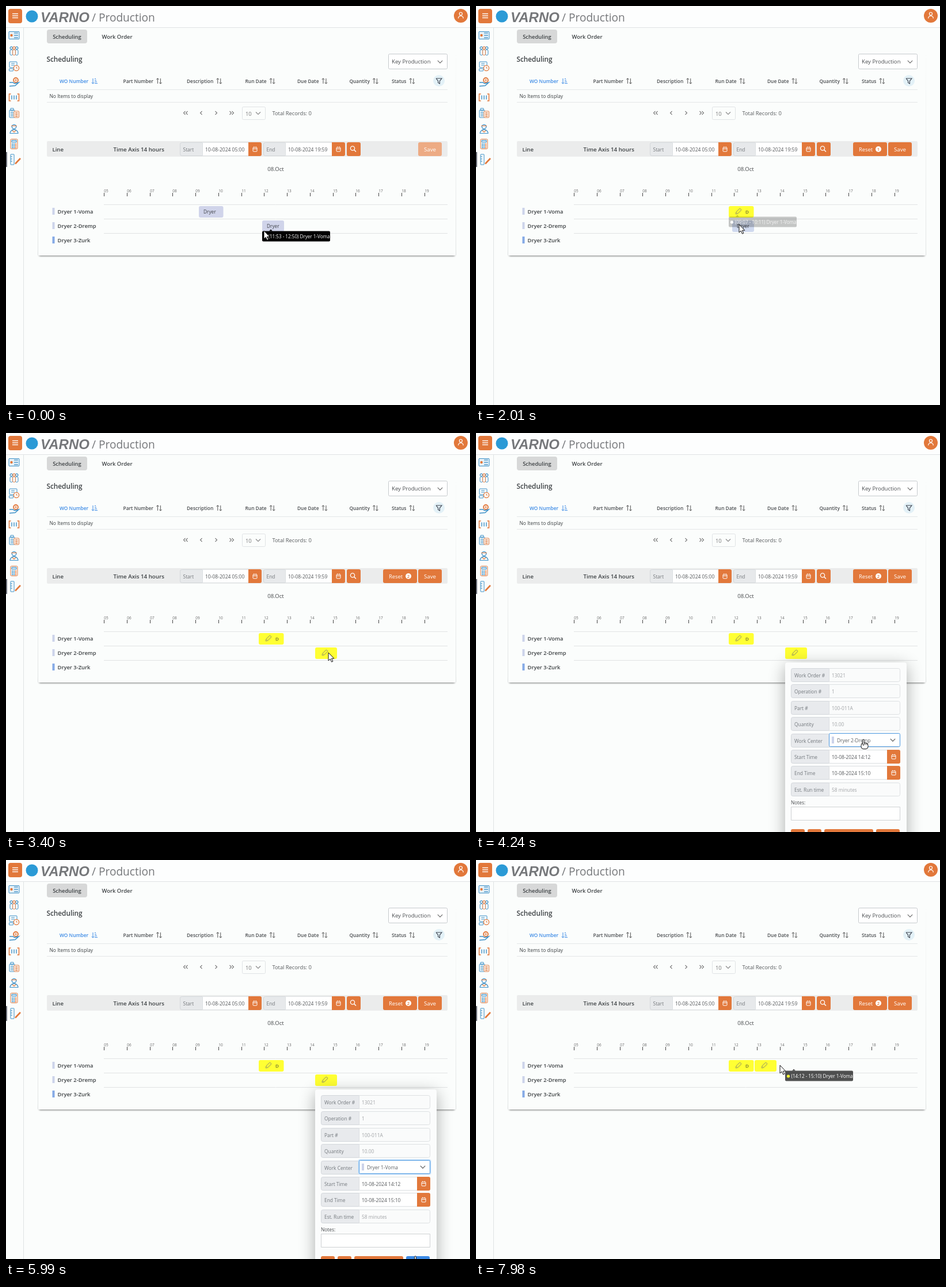
An HTML page with a canvas that plays this animation: 806x694 px, repeating every 8000 ms.

```html
<!DOCTYPE html>
<html lang="en">
<head>
<meta charset="utf-8">
<title>Production scheduling</title>
<style>
html, body { margin: 0; width: 100%; height: 100%; overflow: hidden; background: #fbfdfc; }
canvas { display: block; }
</style>
</head>
<body>
<canvas id="stage" width="806" height="694"></canvas>
<script>
const ctx = document.getElementById('stage').getContext('2d');
const LOOP = 8000, STEP = 134;
const ORANGE = '#e2783b', BLUE = '#3b8fc6', LINK = '#3b8ae6', INK = '#3c4043', PAGE = '#fbfdfc';
const LILAC = '#d0d4ea', YELLOW = '#ffff33', RULE = '#dde0e2';
const LINES = ['Dryer 1-Voma', 'Dryer 2-Dremp', 'Dryer 3-Zurk'];
const BARS = ['#ccd3ea', '#ccd3ea', '#85aae6'];
const SANS = '"Open Sans", "Noto Sans", sans-serif';
const HOUR = 39.77, AXIS = 170.5;

// Moments of the story, in ms
const AT = {
  grabA: 1210, dropA: 1880, grabB: 2430, dropB: 3000, form: 3550, focus: 3980, list: 4520,
  pick: 5050, ok: 5730, close: 6250, moved: 6390, grabC: 7330, dropC: 7850
};

// Pointer stops: time, x, y
const STOPS = [
  [0, 448, 391], [800, 351, 366], [1060, 350, 363], [1200, 383, 361], [AT.dropA, 471, 361], [2010, 457, 380],
  [AT.grabB, 468, 380], [2850, 560, 382], [AT.form, 560, 382], [AT.focus, 673, 533], [4640, 673, 533],
  [4910, 662, 556], [AT.ok, 711, 689], [6600, 711, 689], [7180, 559, 374], [AT.grabC, 557, 361],
  [AT.dropC, 504, 358], [7900, 528, 357]
];

function pointerAt(time) {
  const t = Math.floor(time / STEP) * STEP;
  const i = STOPS.findIndex(s => s[0] > t);
  if (i < 0) return STOPS.at(-1).slice(1);
  const [t0, x0, y0] = STOPS[i - 1], [t1, x1, y1] = STOPS[i];
  const u = (t - t0) / (t1 - t0), k = u * u * (3 - 2 * u);
  return [x0 + (x1 - x0) * k, y0 + (y1 - y0) * k];
}

const within = (t, a, b) => t >= a && t < b;

function text(s, x, y, size, color = INK, weight = 400, align = 'left') {
  ctx.font = `${weight} ${size}px ${SANS}`;
  ctx.fillStyle = color;
  ctx.textAlign = align;
  ctx.fillText(s, x, y + size * 0.36);
  return ctx.measureText(s).width;
}

function paint(fill, stroke, width = 1) {
  if (fill) { ctx.fillStyle = fill; ctx.fill(); }
  if (stroke) { ctx.strokeStyle = stroke; ctx.lineWidth = width; ctx.stroke(); }
}

function box(x, y, w, h, fill, r = 0, stroke) {
  ctx.beginPath();
  ctx.roundRect(x, y, w, h, r);
  paint(fill, stroke);
}

function disc(x, y, r, fill, stroke, width) {
  ctx.beginPath();
  ctx.arc(x, y, r, 0, Math.PI * 2);
  paint(fill, stroke, width);
}

// Upper half circle
function dome(x, y, r, color) {
  ctx.beginPath();
  ctx.arc(x, y, r, Math.PI, 0);
  paint(null, color, 1.3);
}

function line(color, width, ...p) {
  ctx.beginPath();
  for (let i = 0; i < p.length; i += 2) ctx.lineTo(p[i], p[i + 1]);
  paint(null, color, width);
}

const hline = (color, y, x0, x1) => line(color, 1, x0, y, x1, y);

// n parallel strokes, each (w, h) long, spaced by (dx, dy)
function strokes(color, width, n, x, y, w, h, dx, dy) {
  for (let i = 0; i < n; i++) line(color, width, x + i * dx, y + i * dy, x + i * dx + w, y + i * dy + h);
}

function at(x, y, draw, alpha = 1, angle = 0) {
  ctx.save();
  ctx.translate(x, y);
  ctx.rotate(angle);
  ctx.globalAlpha *= alpha;
  draw();
  ctx.restore();
}

// Points down at angle 0
const chevron = (x, y, s = 4, color = '#666', angle = 0) =>
  at(x, y, () => line(color, 1.1, -s, -s / 2, 0, s / 2, s, -s / 2), 1, angle);

function arrow(x, y, color, angle = 0) {
  at(x, y, () => {
    line(color, 1, 0, -4.5, 0, 4.5);
    line(color, 1, -2.2, 2.5, 0, 4.8, 2.2, 2.5);
  }, 1, angle);
}

function calendar(x, y, h = 24) {
  box(x, y, 23, h, ORANGE, [0, 3, 3, 0]);
  at(x + 11.5, y + h / 2, () => {
    box(-3.5, -3, 7, 7, null, 1, '#fff');
    hline('#fff', -0.5, -3.5, 3.5);
    strokes('#fff', 1, 2, -1.8, -4.5, 0, 1.5, 3.6, 0);
  });
}

const icons = [
  () => {
    box(-9, -6.5, 18, 13, '#e6f1f8', 1, BLUE);
    disc(-4.5, 0, 2.2, ORANGE);
    strokes(BLUE, 1.3, 3, 0, -4, 7, 0, 0, 4);
  },
  () => {
    for (const [x, color] of [[-4.7, BLUE], [4.7, BLUE], [0, ORANGE]]) {
      disc(x, -5, 2.2, PAGE, color, 1.2);
      box(x - 2.3, -2, 4.6, 9.5, PAGE, 2, color);
    }
  },
  () => {
    box(-8, -8, 13, 10, null, 1, BLUE);
    strokes(BLUE, 1, 2, -5, -5, 6, 0, 0, 3);
    box(-8.5, 4, 7, 4, null, 0.5, BLUE);
    disc(4, 3, 4.6, PAGE, ORANGE, 1.3);
    line(ORANGE, 1, 4, 0.5, 4, 3, 6, 3);
  },
  () => {
    disc(3, -3, 4, null, ORANGE, 1.8);
    disc(3, -3, 1.3, null, ORANGE);
    line(BLUE, 1.5, -8, 1, -2, 1, 1, 3, 8, 1, 2, 6.5, -8, 7.5);
  },
  () => {
    for (const s of [-1, 1]) line(ORANGE, 1.5, s * 5.5, -6, s * 8.5, -6, s * 8.5, 6, s * 5.5, 6);
    strokes(BLUE, 1.4, 3, -4, -3.5, 0, 7, 4, 0);
  },
  () => {
    box(-8, -5, 9, 13, null, 1, BLUE);
    box(-6, -8, 5, 4, null, 0, BLUE);
    strokes(BLUE, 1.2, 3, -6, -1, 5, 0, 0, 3);
    box(0, -3, 8.5, 11, PAGE, 1, ORANGE);
    strokes(ORANGE, 1.4, 3, 2, 0, 4.5, 0, 0, 2.8);
  },
  () => {
    disc(0, -3, 3.7, null, BLUE, 1.3);
    hline(ORANGE, -4.5, -5, 5);
    dome(0, 9, 7, BLUE);
    hline(BLUE, 8.5, -7, 7);
    chevron(0, 5, 3, ORANGE);
  },
  () => {
    box(-6, -8.5, 12, 17, null, 1.5, ORANGE);
    box(-4, -6.5, 8, 3.5, '#cfe4f2', 0, BLUE);
    for (let i = 0; i < 9; i++) box(-4 + (i % 3) * 3, -0.8 + (i / 3 | 0) * 3, 2, 2, i % 3 < 2 ? BLUE : ORANGE);
  },
  () => {
    box(-6, -9, 6, 18, null, 0.5, BLUE);
    strokes(BLUE, 1, 3, -6, -5, 3, 0, 0, 4);
    line(ORANGE, 2.6, 2, 7.5, 11, -2);
  }
];

function drawHeader() {
  box(0, 0, 806, 37, '#fdfefe');
  hline('#e0e3e4', 37.5, 0, 806);
  line('#e0e3e4', 1, 30.5, 38, 30.5, 694);
  box(4, 5, 24, 25, ORANGE, 4);
  strokes('#fff', 1.4, 3, 11, 13.5, 10, 0, 0, 3.5);
  disc(45, 18, 10.5, '#2b9ad6');
  ctx.font = 'italic 700 24px "Liberation Sans", Arial, sans-serif';
  ctx.fillStyle = '#75777a';
  ctx.textAlign = 'left';
  ctx.fillText('VARNO', 60, 28);
  text('/ Production', 149, 20, 19.1, '#75777a');
  disc(790, 17, 12, ORANGE);
  disc(790, 13.5, 2.5, null, '#fff', 1.2);
  dome(790, 21.5, 4.3, '#fff');
  icons.forEach((icon, i) => at(14, 51 + i * 27, icon));
  box(0, 254, 2, 26, '#6b6e78');
}

function drawCard() {
  ctx.save();
  ctx.shadowColor = 'rgba(0,0,0,.55)';
  ctx.shadowBlur = 3;
  ctx.shadowOffsetY = 1;
  box(57, 424, 723, 10, PAGE, 3);
  ctx.restore();
  box(55, 65, 727, 369, PAGE, 3);
  const side = ctx.createLinearGradient(0, 65, 0, 434);
  side.addColorStop(0, 'rgba(225,228,228,0)');
  side.addColorStop(1, '#e1e4e4');
  strokes(side, 1, 2, 55.5, 65, 0, 368, 726, 0);
}

function drawTable() {
  box(71, 41, 70, 24, '#d7d8d8', 4);
  text('Scheduling', 106, 53.5, 9.45, INK, 600, 'center');
  text('Work Order', 193, 53.5, 9.45, INK, 600, 'center');
  text('Scheduling', 70.5, 92.5, 11.8, INK, 600);
  box(664.5, 83.5, 102, 26, '#fff', 2, '#c6cacd');
  text('Key Production', 670, 97, 9.6, '#4a4d50');
  chevron(754, 97, 4.2);

  text('WO Number', 93, 130.5, 8.4, LINK, 600);
  arrow(151, 130.5, LINK);
  for (let i = 0; i < 4; i++) hline(LINK, 126.5 + i * 2.7, 154, 156 + i);
  const columns = { 'Part Number': 203.5, Description: 314, 'Run Date': 415.5, 'Due Date': 506, Quantity: 596.5, Status: 670 };
  for (const [name, x] of Object.entries(columns)) {
    const end = x + text(name, x, 130.5, 8.35, '#4a4d50', 600);
    arrow(end + 7.5, 130.5, '#555', Math.PI);
    arrow(end + 12.5, 130.5, '#555');
  }
  disc(752, 130, 10, '#e3f1f7');
  line('#3d4450', 1.1, 747, 126, 757, 126, 753.4, 130.3, 753.4, 135, 750.6, 133.4, 750.6, 130.3, 747, 126);
  strokes('#e4e7e8', 1, 2, 71, 145.5, 696, 0, 0, 22);
  text('No Items to display', 75.5, 157, 8.45);

  for (const s of [-1, 1])
    for (const d of [13, 38, 42]) chevron(352 + s * d, 186, 3, '#777', -s * Math.PI / 2);
  box(410.5, 175.5, 40, 22, null, 2, '#e0e3e5');
  text('10', 416, 187.5, 9.4, '#777');
  chevron(438, 186.5, 4, '#888');
  text('Total Records: 0', 462.5, 186.5, 9.3, '#55585b');
}

function dateField(label, x, value, inputX, w) {
  box(x + 0.5, 237.5, inputX - x, 23, '#e7e9eb', [3, 0, 0, 3], '#d3d7da');
  text(label, x + 5.5, 249.5, 8.45, '#75797c');
  box(inputX + 0.5, 237.5, w, 23, '#fff', 0, RULE);
  text(value, inputX + 5, 249.5, 8.5, '#55585b');
  calendar(inputX + w, 237);
}

function drawToolbar(edits) {
  box(71, 235, 696, 27, '#ebecec', 2);
  text('Line', 80.5, 249.5, 9.6, INK, 600);
  text('Time Axis 14 hours', 186.5, 249.5, 9.75, INK, 600);
  dateField('Start', 302, '10-08-2024 05:00', 341, 80);
  dateField('End', 447, '10-08-2024 19:59', 485, 81);
  box(592, 237, 24, 24, ORANGE, 3);
  disc(602, 247.5, 3.6, null, '#fff', 1.3);
  line('#fff', 1.5, 604.7, 250.2, 608, 253.5);
  if (edits) {
    box(655, 237, 59, 24, ORANGE, 3);
    text('Reset', 665, 249.5, 9.4, '#fff');
    disc(699, 249, 5, '#fff');
    text(edits, 699, 249, 7.5, ORANGE, 600, 'center');
  }
  box(716, 237, 41, 24, edits ? ORANGE : '#edab84', 3);
  text('Save', 736.5, 249.5, 9.7, '#fff', 400, 'center');
}

function drawAxis() {
  text('08.Oct', 468.5, 284, 9.6, '#45484b', 400, 'center');
  for (let i = 0; i < 15; i++) {
    const x = Math.floor(AXIS + i * HOUR) + 0.5;
    line('#444', 1, x, 325, x, 331);
    text(String(i + 5).padStart(2, '0'), x + 3.5, 321.5, 6.4, '#666', 400, 'center');
  }
  LINES.forEach((name, i) => {
    const y = 357 + i * 25;
    hline('#e1e3e4', y - 11.5, 170, 767);
    box(80.5, y - 6, 4, 12, BARS[i]);
    text(name, 89.5, y + 0.5, 9.4, INK, 600);
  });
}

function block(x, row, w, color, edited) {
  const y = 348 + row * 25;
  ctx.save();
  box(x, y, w, 20, color, 3);
  ctx.clip();
  if (edited) {
    at(x + 16.5, y + 9.5, () => {
      box(-3.5, -2, 9.5, 4, null, 1, '#a9a95c');
      chevron(-5, 0, 2, '#a9a95c', Math.PI / 2);
    }, 1, -Math.PI / 4);
    if (w > 40) text('D', x + 29, y + 10, 8, '#333');
  } else text('Dryer', x + 8, y + 10.5, 8.25, '#3f4248');
  ctx.restore();
}

function drawBlocks(t, px) {
  const editedA = t >= AT.dropA, editedB = t >= AT.dropB;
  const xA = t < AT.grabA ? 335 : editedA ? 439 : px - 32;
  block(xA, 0, editedA ? 43.5 : 42.5, editedA ? YELLOW : t < AT.grabA ? LILAC : '#d2cae4', editedA);

  let xB = 445;
  if (t >= AT.dropC) xB = 484;
  else if (t >= AT.grabC) xB = Math.min(537, px - 20);
  else if (t >= AT.grabB) xB = Math.min(537, px - 23);
  block(xB, t < AT.moved ? 1 : 0, 38, editedB ? YELLOW : t < 540 ? LILAC : '#cfd9ee', editedB);
}

// The panel fades as one layer, so its text stays white
function tip(x, row, span, alpha, dot = LILAC) {
  at(x, 366.5 + row * 25, () => {
    const panel = `rgba(0,0,0,${alpha})`;
    box(0, 0, 118, 18, panel, 2);
    ctx.beginPath();
    for (let i = 0; i < 3; i++) ctx.lineTo(12 + i * 3, i % 2 * -3);
    paint(panel);
    disc(5.5, 9.5, 2.6, alpha < 0.5 ? '#fff' : dot);
    text(`(${span}) ${LINES[0]}`, 10.5, 9.5, 8.1, alpha < 0.5 ? '#f4f4f4' : '#fff');
  });
}

function drawTips(t) {
  const ghost = 0.22, spanA = '09:07 - 10:11', spanB = '11:53 - 12:50';
  if (t < 390) tip(445, 1, spanB, 1 - Math.floor(t / 130) * 0.3);
  if (within(t, AT.grabA, AT.grabA + 150)) tip(335, 0, spanA, ghost);
  if (within(t, AT.dropA, 2150)) tip(439, 0, spanA, ghost);
  if (within(t, 2300, 2850)) tip(445, 1, spanB, t < 2580 ? 0.9 : ghost);
  if (t >= AT.grabC) tip(537, 0, '14:12 - 15:10', t < AT.dropC ? ghost : 0.68, YELLOW);
}

function option(i, y) {
  box(618, y - 6, 4, 12, BARS[i]);
  text(LINES[i], 627, y + 0.5, 8.4, '#5c6063');
}

function formRow(label, value, i) {
  const y = Math.round(409 + i * 28.4), timed = label.endsWith(' Time');
  box(547.5, y + 0.5, 66, 23, '#e8eaed', [3, 0, 0, 3], '#d3d7db');
  text(label, 553, y + 12.5, 8.4, '#73787d', 500);
  box(613.5, y + 0.5, 123, 23, timed ? '#fff' : '#fafbfb', [0, 3, 3, 0], RULE);
  text(value, 618, y + 12.5, 8.4, timed ? '#55585b' : '#a0a3a6');
  if (timed) calendar(714, y);
}

function drawForm(t) {
  ctx.save();
  ctx.shadowColor = 'rgba(0,0,0,.32)';
  ctx.shadowBlur = 28;
  ctx.shadowOffsetY = 6;
  box(537, 399, 211, 330, '#fbfcfc', 4);
  ctx.restore();
  const fields = {
    'Work Order #': '13021', 'Operation #': '1', 'Part #': '100-011A', 'Quantity': '10.00', 'Work Center': '',
    'Start Time': '10-08-2024 14:12', 'End Time': '10-08-2024 15:10', 'Est. Run time': '58 minutes'
  };
  Object.entries(fields).forEach(([label, value], i) => formRow(label, value, i));

  if (t >= AT.list) box(611.5, 520.5, 127, 27, '#c3dffa', 4);
  box(613.5, 522.5, 123, 23, '#fff', 2, t >= AT.focus ? '#4a97e0' : '#d3d7db');
  option(t < AT.pick ? 1 : 0, 534);
  chevron(724, 534, 4.2, '#555');

  text('Notes:', 547, 643, 8.4, '#4a4d50');
  box(547.5, 650.5, 189, 23, '#fff', 0, '#cfd2d4');
  ctx.font = '8px "DejaVu Sans Mono", monospace';
  ctx.fillText('Notes for WO 13021 - Jorv 20240814', 549, 660);

  let x = 547;
  for (const w of [24, 24, 85, 41]) {
    box(x, 689, w, 24, w === 41 && t >= AT.ok ? LINK : ORANGE, 3);
    x += w + 5;
  }

  if (within(t, AT.list, AT.pick + STEP)) {
    box(613.5, 547.5, 123, 79, '#fff', 2, '#d3d7db');
    box(614, t < 4790 ? 575 : 549, 122, 25, '#e3effb');
    LINES.forEach((_, i) => option(i, 561 + i * 26));
  }
}

function drawPointer(t, [x, y]) {
  at(x, y, () => {
    if (within(t, AT.focus, 6600)) {
      box(-4, 6, 12, 10.5, '#fff', 4, '#111');
      box(-1.3, 0, 2.6, 10, '#fff', 1.3, '#111');
      strokes('#111', 0.8, 2, 3.8, 6.5, 0, 3, 2.2, 0);
      return;
    }
    ctx.beginPath();
    for (const [dx, dy] of [[0, 0], [0, 14], [3.2, 11], [5.6, 16.2], [7.8, 15.2], [5.5, 10.2], [9.8, 10.2]]) ctx.lineTo(dx, dy);
    ctx.closePath();
    ctx.lineJoin = 'round';
    paint('#fff', '#111');
  });
}

function render(t) {
  const pointer = pointerAt(t);
  box(0, 0, 806, 694, PAGE);
  drawHeader();
  drawCard();
  drawTable();
  drawToolbar((t >= AT.dropA) + (t >= AT.dropB));
  drawAxis();
  drawBlocks(t, pointer[0]);
  drawTips(t);
  if (within(t, AT.form, AT.close)) at(0, 0, () => drawForm(t), t < AT.form + STEP ? 0.6 : 1);
  drawPointer(t, pointer);
}

const start = performance.now();
function tick() {
  render((performance.now() - start) % LOOP);
  requestAnimationFrame(tick);
}
tick();
</script>
</body>
</html>
```
